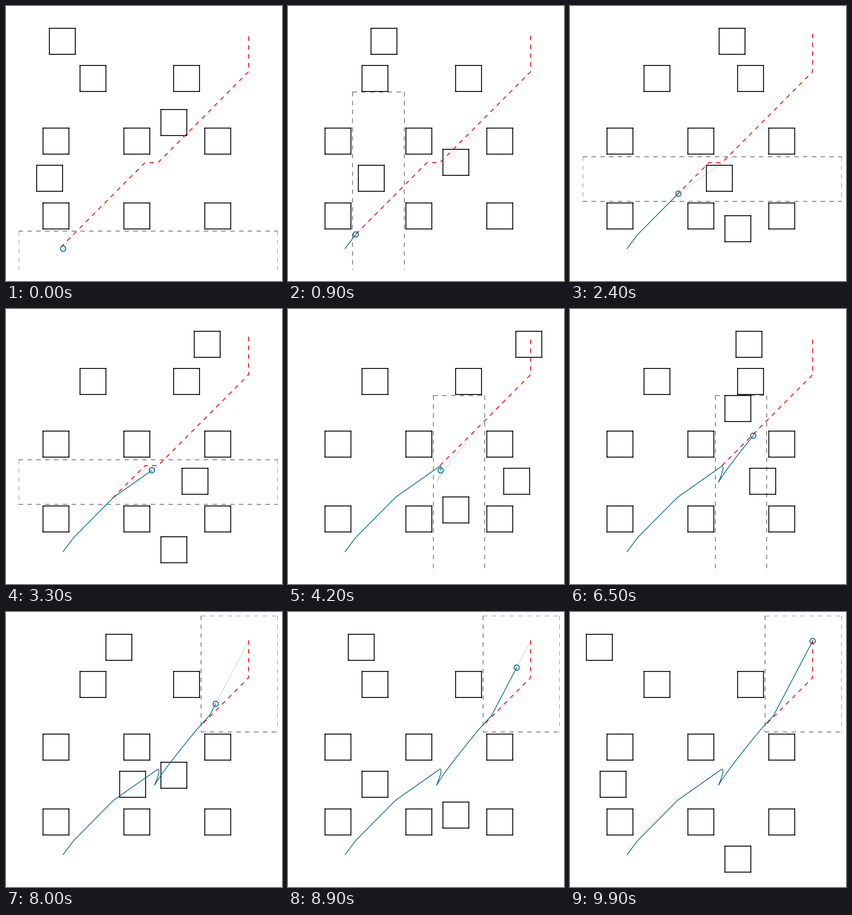
Animation of 522 by 518 pixels, one loop 10 s. Source, as a matplotlib script:

```python
import numpy as np
import matplotlib.pyplot as plt
from matplotlib.animation import FuncAnimation
from matplotlib.patches import Circle

W, H, DPI = 522, 518, 100
FRAMES, STEP_MS = 100, 100
L, T, R, B = 24, 7, 514, 497
BELOW = B + 15
CELL = 12.24
SIDE, SPEED = 49, 8.32
HORIZON, FINE = 25, 10
TEAL, GREY, DASH = "#006688", "#808080", (0, (5, 5))

# Grid corners of the planned route, from start to goal
ROUTE = [(6.5, 3.5), (19.5, 16.5), (21.5, 16.5), (35.5, 30.5), (35.5, 36.5)]

# Robot legs: arrival step, end point, optional bend
START = (108, 457)
LEGS = [
    (8.2, (127.5, 431), None),
    (22.8, (203, 355), None),
    (36, (287, 296), None),
    (47.5, (281, 326), (294, 295)),
    (70, (362, 220), (298, 297)),
    (73.5, (385, 195), None),
    (99.5, (459, 54.5), None),
]

# Free regions: step when entered, route column where the plan starts, box
STAGES = [
    (0, 6.5, (L, 424, R, BELOW)),
    (8.2, 8.5, (122, 162, 220, BELOW)),
    (22.8, 14.5, (L, 284, R, 368)),
    (36, 21.5, (275, 163, 372, BELOW)),
    (70, 27.5, (L, 163, R, 227)),
    (73.5, 28.5, (369, T, R, 226)),
]


def bezier(p, c, q, s):
    s = s[:, None]
    return (1 - s) ** 2 * p + 2 * s * (1 - s) * c + s * s * q


def make_track():
    """Robot positions at FINE samples per step, eased on every leg."""
    t = np.arange(FRAMES * FINE) / FINE
    track = np.empty((len(t), 2))
    t0, p = 0, np.array(START)
    for t1, q, bend in LEGS:
        q = np.array(q)
        c = (p + q) / 2 if bend is None else np.array(bend)
        u = np.clip((t - t0) / (t1 - t0), 0, 1)
        later = t >= t0
        track[later] = bezier(p, c, q, u * u * (3 - 2 * u))[later]
        t0, p = t1, q
    return track


def bounce(start, lo, hi, k):
    span = hi - lo
    return hi - abs((start + SPEED * k - lo) % (2 * span) - span)


def route_from(col):
    xs, ys = zip(*ROUTE[:-1])
    cells = [(col, np.interp(col, xs, ys))] + [c for c in ROUTE if c[0] > col]
    i, j = np.array(cells).T
    return L + 0.3 + CELL * i, B - CELL * j


def edges(x0, y0, x1, y1):
    """Four separate sides, drawn rightwards and downwards."""
    gap = np.nan
    return ([x0, x1, gap, x0, x1, gap, x0, x0, gap, x1, x1],
            [y0, y0, gap, y1, y1, gap, y0, y1, gap, y0, y1])


def square(x, y):
    return edges(x, y, x + SIDE, y + SIDE)


fig = plt.figure(figsize=(W / DPI, H / DPI), dpi=DPI, facecolor="white")
ax = fig.add_axes([L / W, 1 - B / H, (R - L) / W, (B - T) / H])
ax.set_xlim(L, R)
ax.set_ylim(B, T)
ax.axis("off")


def line(color, lw=1.2, **style):
    return ax.plot([], [], color=color, lw=lw, **style)[0]


region = line(GREY, ls=DASH)
fixed = [(140, 112), (317, 112)]
fixed += [(x, y) for y in (230, 371) for x in (70, 223, 376)]
for corner in fixed:
    line("black").set_data(*square(*corner))
top, middle, lift = (line("black") for _ in range(3))
plan = line(TEAL, 1, alpha=0.2)
trail = line(TEAL, 1)
path = line("red", ls=DASH)
dot = ax.add_patch(Circle(START, 5, fill=False, ec=TEAL, lw=1.2, zorder=3))

TRACK = make_track()


def draw(k):
    top.set_data(*square(bounce(81.9, 28, 468.35, k), 42))
    middle.set_data(*square(bounce(58.2, 28, 469.5, k), 300))
    lift.set_data(*square(293, bounce(195, 160.4, 449.2, k)))

    n = max(i for i, stage in enumerate(STAGES) if stage[0] <= k)
    _, col, box = STAGES[n]
    region.set_data(*edges(*box))
    path.set_data(*route_from(col))

    end = STAGES[n + 1][0] if n + 1 < len(STAGES) else FRAMES
    end = min(end, k + HORIZON)
    now = k * FINE
    trail.set_data(*TRACK[:now + 1].T)
    plan.set_data(*TRACK[now:int(end * FINE) + 1].T)
    dot.center = tuple(TRACK[now])
    return top, middle, lift, region, path, plan, trail, dot


anim = FuncAnimation(fig, draw, frames=FRAMES, interval=STEP_MS,
                     repeat=True, repeat_delay=0, blit=False)
plt.show()
```
